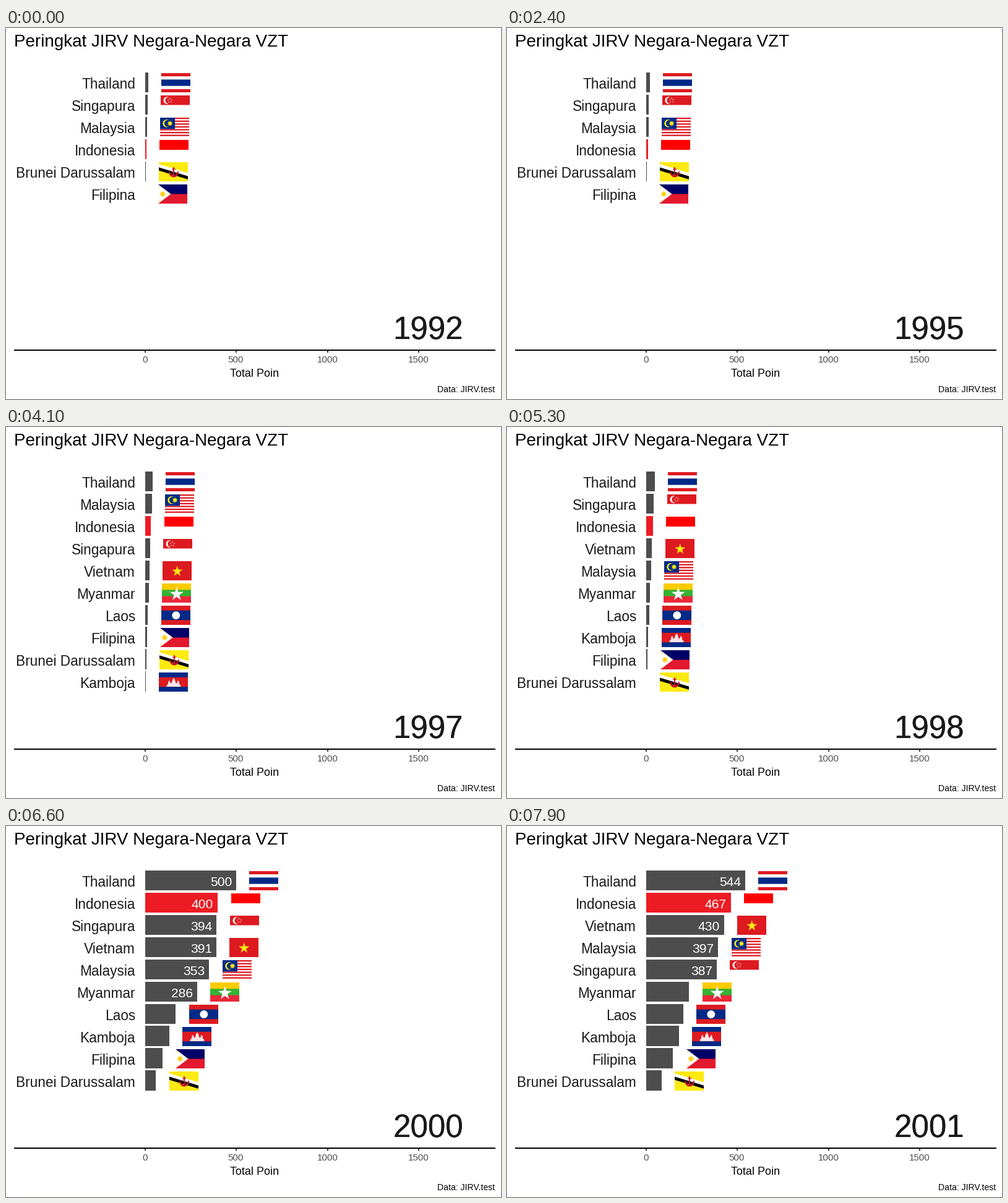
These frames come from a looping animation (800 by 600 pixels, 8 s). A matplotlib script:

```python
import numpy as np
import matplotlib.pyplot as plt
from matplotlib.animation import FuncAnimation
from matplotlib.patches import Circle, Polygon, Rectangle
from matplotlib.transforms import Affine2D

plt.rcParams["font.family"] = "Liberation Sans"

W, H, DPI = 800, 600, 100
STEP, FRAMES = 100, 80
ZERO, UNIT = 225, 0.2946          # pixel of value 0, pixels per point
ROW_H = 36
FLAG_W, FLAG_H, FLAG_X = 47, 31, 245.8
GREY, RED = "#4d4d4d", "#ed1c24"
NAVY, CRIMSON, YELLOW, GOLD = "#012a87", "#dd1a20", "#fcea10", "#fcd116"

fig = plt.figure(figsize=(W / DPI, H / DPI), dpi=DPI, facecolor="white")
ax = fig.add_axes([0, 0, 1, 1])
ax.set_xlim(0, W)
ax.set_ylim(H, 0)
ax.axis("off")


def text(x, y, s, px, color="black", ha="left"):
    return ax.text(x, y, s, fontsize=px * 72 / DPI, color=color, ha=ha,
                   va="baseline")


def rect(x, y, w, h, color):
    return Rectangle((x, y), w, h, fc=color, lw=0)


def poly(points, color):
    return Polygon(points, closed=True, fc=color, lw=0)


def disc(x, y, r, color):
    return Circle((x, y), r, fc=color, lw=0)


def star(x, y, r, color, n=5, inner=0.385):
    a = np.arange(2 * n) * np.pi / n
    d = np.where(np.arange(2 * n) % 2, r * inner, r)
    return poly(np.c_[x + d * np.sin(a), y - d * np.cos(a)], color)


def bands(*parts):
    """Horizontal bands from (colour, share) pairs, each painted downwards."""
    total = sum(share for _, share in parts)
    out, y = [], 0
    for color, share in parts:
        out.append(rect(0, y, FLAG_W, FLAG_H - y, color))
        y += FLAG_H * share / total
    return out


def thailand():
    return bands((CRIMSON, 1), ("white", 1), (NAVY, 2), ("white", 1),
                 (CRIMSON, 1))


def singapore():
    ring = [star(15 + 3 * np.sin(a), 8 - 3 * np.cos(a), 1.3, "white")
            for a in np.arange(5) * 2 * np.pi / 5]
    return bands((CRIMSON, 1), ("white", 1)) + [
        disc(10.3, 8, 5.8, "white"), disc(12.8, 8, 5.4, CRIMSON)] + ring


def malaysia():
    stripes = [("white" if k % 2 else CRIMSON, 1) for k in range(13)]
    return bands(*stripes, ("white", 0.5)) + [
        rect(0, 0, 24, 18.4, NAVY), disc(10.5, 9.3, 6.2, YELLOW),
        disc(12.4, 9.3, 5.4, NAVY), star(16, 9.3, 4.6, YELLOW, 14, 0.55)]


def indonesia():
    return bands(("#ff0000", 16), ("white", 15))


def brunei():
    red = "#cf1126"

    def slant(top, bottom, color):
        drop = 14.2
        return poly([(0, top), (FLAG_W, top + drop),
                     (FLAG_W, bottom + drop), (0, bottom)], color)

    a = np.linspace(0, np.pi, 12)
    bowl = np.r_[np.c_[24 + 8 * np.cos(a), 15 + 9.5 * np.sin(a)],
                 np.c_[24 - 6 * np.cos(a), 15 + 6 * np.sin(a)]]
    return bands((YELLOW, 1)) + [
        slant(3.2, 13.6, "white"), slant(8.4, 13.6, "black"),
        poly(bowl, red), rect(23, 8, 2, 16, red),
        poly([(20, 12), (24, 9.5), (28, 12)], red)]


def philippines():
    corners = [(2.5, 4.5), (2.5, 26.5), (17.5, 15.5)]
    return bands(("#000066", 1), ("#e3192e", 1)) + [
        poly([(0, 0), (20.5, 15.5), (0, 31)], "white"),
        star(7.3, 15.5, 5.6, GOLD, 8, 0.5), disc(7.3, 15.5, 3.1, GOLD)] + [
        star(x, y, 1.7, GOLD) for x, y in corners]


def vietnam():
    return bands((CRIMSON, 1)) + [star(23.8, 16.5, 9, YELLOW)]


def myanmar():
    return bands(("#fecb00", 1), ("#34b233", 1), ("#ea2839", 1)) + [
        star(23.8, 17.3, 11.5, "white")]


def laos():
    return bands((CRIMSON, 1), (NAVY, 2), (CRIMSON, 1)) + [
        disc(23.8, 15.6, 6.4, "white")]


def cambodia():
    half = [(11.5, 23), (11, 20), (9, 19), (9, 16), (7, 12.5), (5.5, 16),
            (5, 18), (3, 16), (2, 12)]
    temple = ([(24 - x, y) for x, y in half] + [(24, 8.5)]
              + [(24 + x, y) for x, y in half[::-1]])
    return bands((NAVY, 1), (CRIMSON, 2), (NAVY, 1)) + [
        poly(temple, "#fbe6e8")]


# Key points of the later years, at the last three of TIMES.
TEAMS = {
    "T": ("Thailand", thailand, 479, 521, 544),
    "S": ("Singapura", singapore, 373, 414, 387),
    "M": ("Malaysia", malaysia, 317, 389, 397),
    "I": ("Indonesia", indonesia, 374, 426, 467),
    "B": ("Brunei Darussalam", brunei, 58, 64, 87),
    "F": ("Filipina", philippines, 77, 115, 149),
    "V": ("Vietnam", vietnam, 363, 419, 430),
    "Y": ("Myanmar", myanmar, 264, 307, 237),
    "L": ("Laos", laos, 168, 170, 204),
    "K": ("Kamboja", cambodia, 106, 160, 180),
}
TIMES = [4100, 5300, 6000, 7200, 7900]
ENTRY = 2700                      # late teams join here


def ladder(order, top, bottom):
    """Evenly spaced points down a ranking."""
    return dict(zip(order, np.linspace(top, bottom, len(order))))


FIRST = ladder("TSMIBF", 180, 10)
SECOND = ladder("TMISVYLFBK", 420, 35)
THIRD = ladder("TSIVMYLKFB", 490, 30)


def year_at(t):
    return 1993 + int((t - 43) // 878)


class Row:
    def __init__(self, key, name, flag, *late):
        self.first = FIRST.get(key, 0)
        self.points = [SECOND[key], THIRD[key], *late]
        self.start = 0 if key in FIRST else ENTRY
        self.bar = ax.add_patch(
            rect(ZERO, 0, 0, 32, RED if name == "Indonesia" else GREY))
        self.label = text(209, 0, name, 22.6, "#1a1a1a", "right")
        self.value = text(0, 0, "", 21, "white", "right")
        self.shift = Affine2D()
        self.flag = flag()
        for part in self.flag:
            part.set_transform(self.shift + ax.transData)
            part.set_snap(False)
            ax.add_artist(part)

    def at(self, t):
        points = np.interp(t, TIMES, self.points)
        if t < TIMES[0]:
            points = self.first + (points - self.first) * (t / TIMES[0]) ** 4
        # The scoring system grew tenfold in 1999.
        return points if year_at(t) >= 1999 else points / 10

    def show(self, on):
        for part in [self.bar, self.label, self.value, *self.flag]:
            part.set_visible(on)

    def place(self, rank, points):
        y = ROW_H * rank
        top = int(72.2 + 35.97 * rank)
        length = int(points * UNIT)
        self.bar.set_bounds(ZERO, top, length, 104 + y - top)
        self.label.set_y(98 + y)
        self.value.set_text(f"{points:.0f}" if points > 250 else "")
        self.value.set_position((ZERO + length - 7, 97 + y))
        self.shift.clear().translate(round(FLAG_X + points * UNIT), 73 + y)


text(13, 30, "Peringkat JIRV Negara-Negara VZT", 27.8)
text(401.5, 564, "Total Poin", 18, ha="center")
text(790, 589, "Data: JIRV.test", 14, ha="right")
ax.add_patch(rect(13, 520, 778, 2, "black"))
for n in range(0, 2000, 500):
    x = round(ZERO + n * UNIT)
    ax.add_patch(rect(x - 1, 522, 2, 3, "#333333"))
    text(x - 0.5, 541, str(n), 15, GREY, "center")

rows = [Row(key, *team) for key, team in TEAMS.items()]
# Stacked copies give the year its hard, heavy edge.
years = [text(625, 503, "", 51, "#1a1a1a") for _ in range(3)]


def update(i):
    t = i * STEP
    for label in years:
        label.set_text(str(year_at(t)))
    for row in rows:
        row.show(t >= row.start)
    live = [row for row in rows if t >= row.start]
    live.sort(key=lambda row: -row.at(t))
    for rank, row in enumerate(live):
        row.place(rank, row.at(t))
    return []


anim = FuncAnimation(fig, update, frames=FRAMES, interval=STEP, repeat=True,
                     init_func=lambda: update(0))
plt.show()
```
